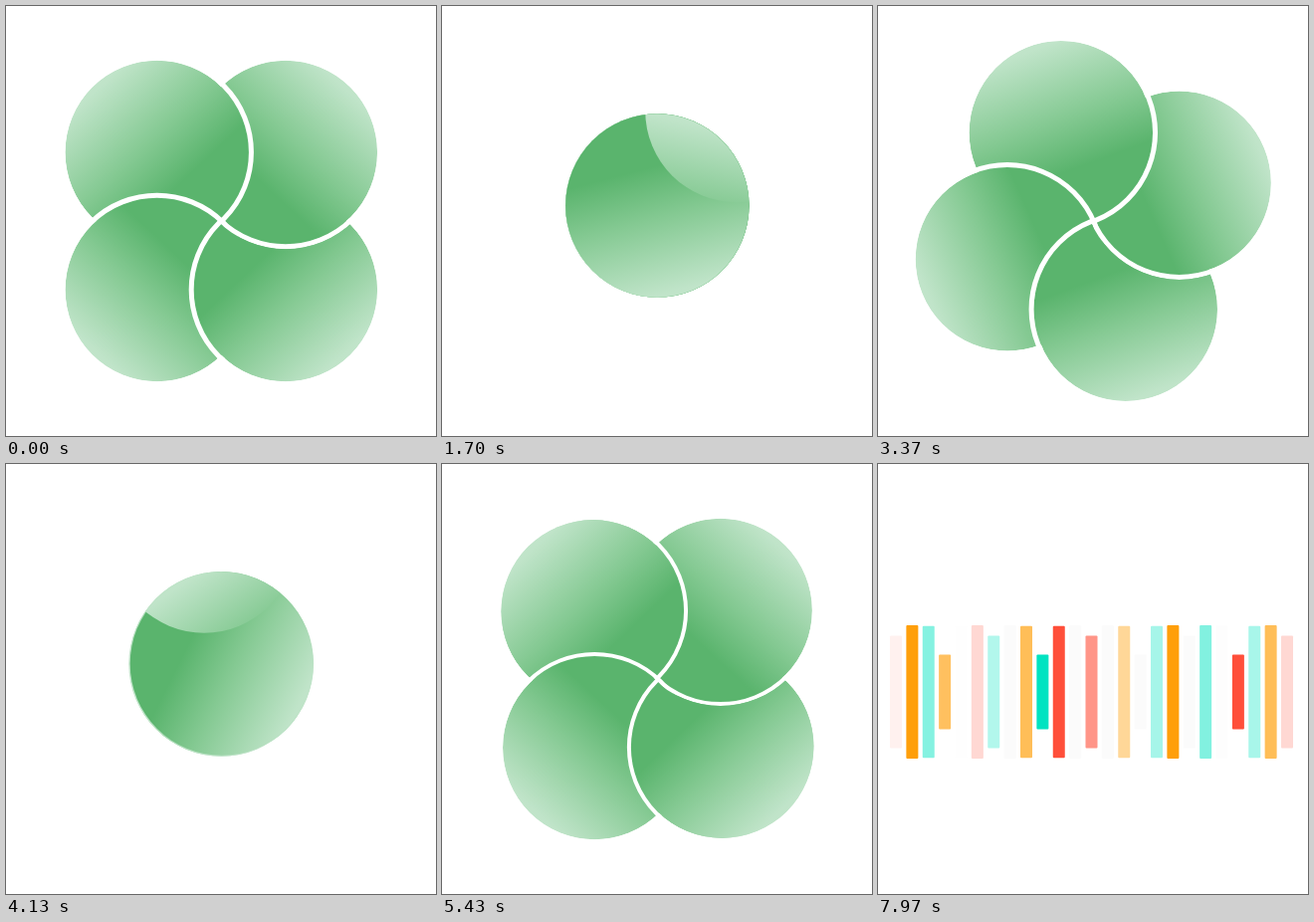
Recreate the animation shown at these times as an HTML page with a canvas. Size 432 px wide and 432 px high, loop 8000 ms.

```html
<!DOCTYPE html>
<html lang="en">
<head>
<meta charset="utf-8">
<title>Loaders</title>
<style>
html, body { margin: 0; width: 100%; height: 100%; overflow: hidden; background: #fff; }
canvas { display: block; width: 100vw; height: 100vh; }
</style>
</head>
<body>
<canvas id="stage"></canvas>
<script>
const SIZE = 432, LOOP = 8000, CYCLE = 2700, FREEZE_AT = 5430, BARS_AT = 5530;
const RAD = Math.PI / 180;
const canvas = document.getElementById('stage');
const ctx = canvas.getContext('2d');

const clamp = u => Math.min(1, Math.max(0, u));
const smooth = u => u * u * (3 - 2 * u);
const quadInOut = u => u < 0.5 ? 2 * u * u : 1 - 2 * (1 - u) ** 2;
const progress = (t, from, to) => clamp((t - from) / (to - from));

// Clover: four discs, each lying over the next one clockwise.
const R = 92.2, ORBIT = 94.5;

// One full turn: slow start, quick middle, long settling.
function turn(t) {
  const lead = 44.2 * (t / 930) ** 2;
  const settle = 360 - 9 * (Math.max(0, 2800 - t) / 300) ** 1.83;
  const mix = smooth(progress(t, 930, 1430));
  return lead + (settle - lead) * mix;
}

function circle(p, r) {
  ctx.beginPath();
  ctx.arc(p.x, p.y, r, 0, Math.PI * 2);
}

function clipIn(p, r) {
  circle(p, r);
  ctx.clip();
}

function clipOut(p, r) {
  ctx.beginPath();
  ctx.rect(0, 0, SIZE, SIZE);
  ctx.arc(p.x, p.y, r, 0, Math.PI * 2);
  ctx.clip('evenodd');
}

function clipped(clip, paint) {
  ctx.save();
  clip();
  paint();
  ctx.restore();
}

function drawClover(t) {
  const gathered = quadInOut(progress(t, 672, 1480));
  const opened = quadInOut(progress(t, 1960, 2785));
  const closed = gathered - opened;
  const orbit = ORBIT * (1 - closed), rot = turn(t);
  const gap = Math.max(0, 5 - (ORBIT - orbit) * 1.2);
  const edgeOrbit = ORBIT + 30 * Math.sin(closed * Math.PI / 2);
  const cutOrbit = orbit + 150 * closed ** 4;
  const sway = Math.sin(Math.PI * gathered), swing = Math.sin(Math.PI * opened);
  const cx = 216.3 - 4 * sway + 6 * swing;
  const cy = 216 - 3 * sway - 15.5 * closed ** 3;

  const place = (angle, dist) => ({
    x: cx + dist * Math.cos(angle * RAD),
    y: cy + dist * Math.sin(angle * RAD)
  });
  const leaf = (rest, twist) => {
    const angle = rest + rot;
    return {
      pos: place(angle, orbit),
      edge: place(angle, edgeOrbit),
      cut: place(angle, cutOrbit),
      dir: (angle + twist * closed ** 3) * RAD
    };
  };
  const fill = ({ pos, dir }) => {
    const dx = Math.cos(dir) * R, dy = Math.sin(dir) * R;
    const g = ctx.createLinearGradient(pos.x + dx * 0.95, pos.y + dy * 0.95,
      pos.x - dx * 0.42, pos.y - dy * 0.42);
    g.addColorStop(0, '#c0e4c9');
    g.addColorStop(0.6, '#84c992');
    g.addColorStop(1, '#5ab46d');
    ctx.fillStyle = g;
    circle(pos, R);
    ctx.fill();
  };
  const ring = p => {
    if (gap <= 0) return;
    ctx.strokeStyle = '#fff';
    ctx.lineWidth = gap;
    circle(p, R + gap / 2);
    ctx.stroke();
  };
  const overlay = l => clipped(() => clipIn(l.edge, R), () => fill(l));

  const tl = leaf(226.9, 0), tr = leaf(313.1, 0);
  const br = leaf(46.9, -28), bl = leaf(133.1, 39);
  fill(br);
  fill(tl);
  fill(tr);
  ring(tr.pos);
  overlay(tl);
  ring(tl.edge);
  fill(bl);
  ring(bl.pos);
  // The last disc closes the circle: over its neighbour, yet under the third.
  clipped(() => clipOut(tr.cut, R + gap), () => overlay(br));
  clipped(() => clipOut(tr.cut, R), () => ring(br.edge));
}

// Equaliser: a wave of heights, delayed bar by bar in groups of six.
const STEP = 130, WAVE = 7, CREST = 3.1, TALL = 138;
const HUES = { r: '#ff4f3a', o: '#ff9f0a', t: '#00e3c1', k: '#888' };
// Hue and opacity in percent of each bar.
const BARS = ('r8 o100 t48 o65 k1 r22 t30 k3 o68 t100 r100 k3 r60 ' +
  'k3 o42 k3 t35 o100 k3 t49 k2 r100 t34 o68 r22').split(' ');

function waveHeight(steps) {
  if (steps < 0) return 1;
  const p = steps % WAVE;
  const level = p < CREST
    ? (p / CREST) ** 1.4
    : 1 - ((p - CREST) / (WAVE - CREST)) ** 2.4;
  return Math.max(1, TALL * level);
}

function drawBars(t) {
  const steps = (t - 5500) / STEP;
  BARS.forEach((bar, i) => {
    const m = i % 6, h = waveHeight(steps - Math.min(m, 6 - m));
    ctx.globalAlpha = bar.slice(1) / 100;
    ctx.fillStyle = HUES[bar[0]];
    ctx.beginPath();
    ctx.roundRect(12 + i * 16.375, 229 - h / 2, 12, h, Math.min(1, h / 2));
    ctx.fill();
  });
  ctx.globalAlpha = 1;
}

function draw(t) {
  const w = Math.round(innerWidth * devicePixelRatio), h = Math.round(innerHeight * devicePixelRatio);
  if (canvas.width !== w || canvas.height !== h) {
    canvas.width = w;
    canvas.height = h;
  }
  ctx.setTransform(w / SIZE, 0, 0, h / SIZE, 0, 0);
  ctx.fillStyle = '#fff';
  ctx.fillRect(0, 0, SIZE, SIZE);
  if (t >= BARS_AT) return drawBars(t);
  const s = Math.min(t, FREEZE_AT);
  drawClover(s < CYCLE + 60 ? s : s - CYCLE);
}

const start = performance.now();
function frame() {
  draw((performance.now() - start) % LOOP);
  requestAnimationFrame(frame);
}
frame();
</script>
</body>
</html>
```
